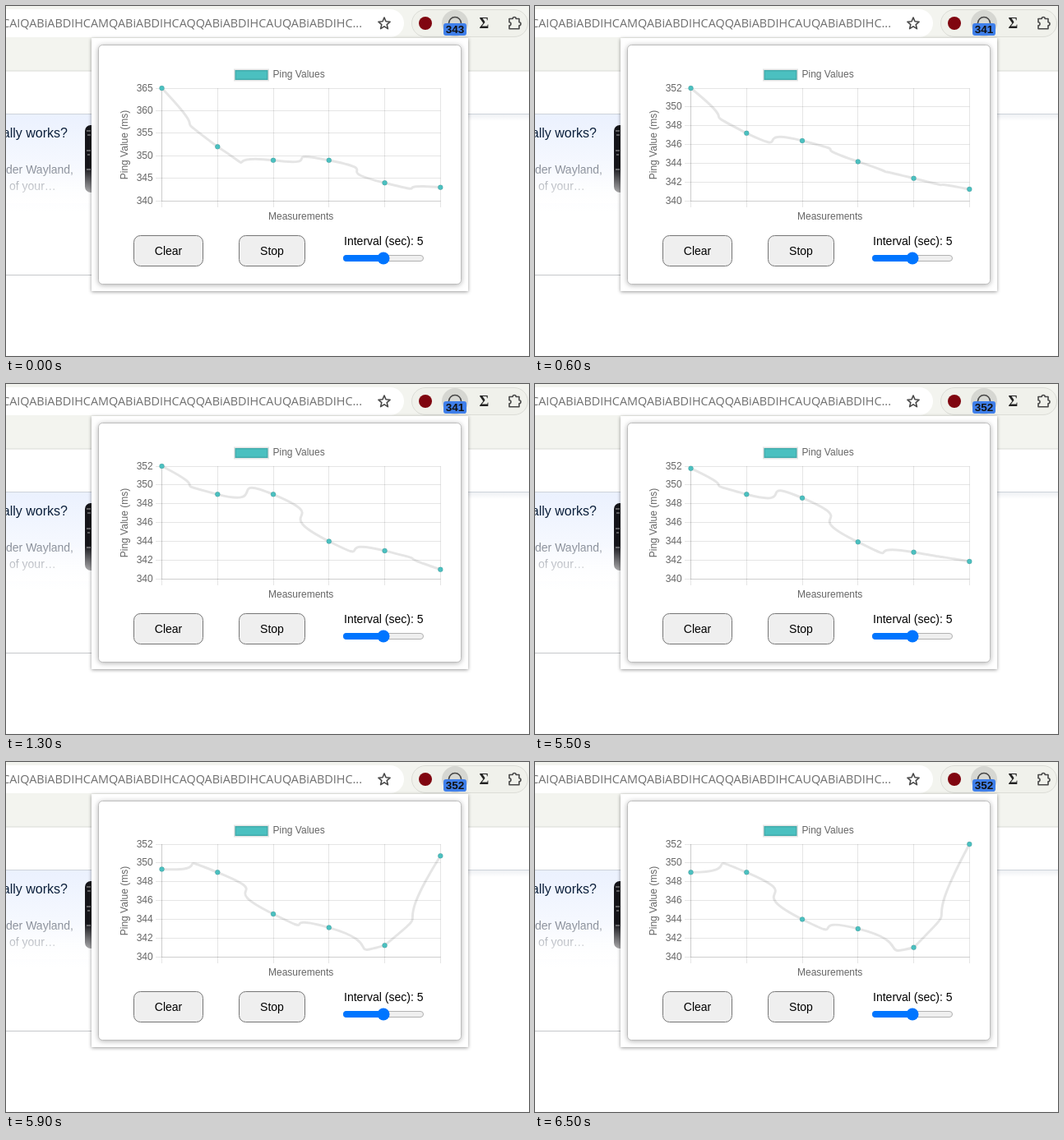
Animation of 636 by 426 pixels, one loop 8000 ms. Source, as an HTML page:

```html
<!DOCTYPE html>
<html lang="en">
<head>
<meta charset="utf-8">
<title>Ping chart</title>
<style>
html, body { margin: 0; width: 100%; height: 100%; overflow: hidden; background: #fff; }
svg { display: block; width: 636px; height: 426px; font-family: "Liberation Sans", Arial, sans-serif; }
.ui { font-size: 14px; fill: #000; text-anchor: middle; }
.chart text { font-size: 12px; fill: #666; }
.mid { text-anchor: middle; }
.end { text-anchor: end; }
.card { fill: #fff; stroke: #bdbdbd; filter: drop-shadow(0 1px 3px rgba(0,0,0,.3)); }
.button { fill: #efefef; stroke: #767676; }
.icon { fill: none; stroke: #474747; stroke-width: 1.6; stroke-linejoin: round; }
.grid { stroke: #000; stroke-opacity: .1; fill: none; }
.line { stroke: #000; stroke-opacity: .1; stroke-width: 3; fill: none; }
.dot { fill: #4bc0c0; stroke: #000; stroke-opacity: .1; }
</style>
</head>
<body>
<svg viewBox="0 0 636 426">
  <defs>
    <linearGradient id="tint" x2="0" y2="1">
      <stop offset="0" stop-color="#ebf1fe"/><stop offset="1" stop-color="#fff"/>
    </linearGradient>
    <linearGradient id="shade" x2="0" y2="1">
      <stop offset="0" stop-color="#dfe3e9"/><stop offset="1" stop-color="#dfe3e9" stop-opacity="0"/>
    </linearGradient>
    <linearGradient id="fade" x2="0" y2="1">
      <stop offset="0" stop-color="#fff" stop-opacity="0"/><stop offset="1" stop-color="#fff" stop-opacity=".9"/>
    </linearGradient>
  </defs>

  <!-- browser bars -->
  <path d="M0 0H636V79H0z" fill="#f3f4ef"/>
  <path d="M0 79H636" stroke="#d9dad6"/>
  <rect x="-30" y="4" width="514" height="34" rx="17" fill="#fff"/>
  <text class="end" x="433" y="26" font-family="'Open Sans','Noto Sans',sans-serif" font-size="14.4" fill="#707070">CAIQABiABDIHCAMQABiABDIHCAQQABiABDIHCAUQABiABDIHC...</text>
  <path class="icon" d="M460 14l2 4.7 5.1.5-3.9 3.4 1.2 5-4.4-2.7-4.4 2.7 1.2-5-3.9-3.4 5.1-.5z"/>
  <rect x="493.500" y="4.500" width="141" height="33" rx="16.500" fill="#f0f1eb" stroke="#dcddd7"/>
  <circle cx="510" cy="21" r="8" fill="#800610"/>
  <circle cx="546" cy="21" r="16" fill="#d6d7d2"/>
  <circle class="icon" cx="546" cy="21" r="7.500"/>
  <rect x="532" y="21" width="28" height="15" rx="3" fill="#3f7fea"/>
  <text id="badge" class="mid" x="546" y="33.200" font-size="13.500" font-weight="bold" fill="#111"></text>
  <text class="mid" x="581.500" y="27" font-family="'Liberation Serif',serif" font-size="18" font-weight="bold" fill="#222">Σ</text>
  <path class="icon" d="M612 15.500h4.200a2 2 0 0 1 4 0h3.800v4.200a2 2 0 0 1 0 4v4h-12v-4a2 2 0 0 0 0-4z"/>

  <!-- page -->
  <rect y="132" width="104" height="118" fill="url(#tint)"/>
  <rect x="562" y="132" width="74" height="8" fill="url(#shade)" opacity=".5"/>
  <path d="M0 131.500H636" stroke="#cdd3da"/>
  <text class="end" x="75" y="160" font-size="16" fill="#0b1f3a">ally works?</text>
  <g font-size="14" fill="#858b96">
    <text class="end" x="82" y="204">der Wayland,</text>
    <text x="4" y="224">of your…</text>
  </g>
  <rect x="96" y="145" width="30" height="82" rx="7" fill="#15151a"/>
  <path d="M98 152h5M99 157h4M98 176h5M99 181h3M98 199h5" stroke="#aaa"/>
  <rect y="196" width="104" height="44" fill="url(#fade)"/>
  <path d="M0 327.500H104" stroke="#c6c8cb"/>
  <path d="M0 425.500H636" stroke="#fafafa"/>

  <!-- popup -->
  <path d="M104 39H562V347H104z" fill="#fff" style="filter:drop-shadow(0 1px 2px rgba(0,0,0,.4))"/>
  <rect class="card" x="112.500" y="47.500" width="441" height="291" rx="5"/>
  <g class="chart">
    <rect x="278.500" y="78" width="40" height="12" fill="#4bc0c0" stroke="#000" stroke-opacity=".1" stroke-width="3"/>
    <text x="324.500" y="87">Ping Values</text>
    <text class="mid" transform="translate(148 169) rotate(-90)">Ping Value (ms)</text>
    <text class="mid" x="358.700" y="260">Measurements</text>
    <path id="grid" class="grid"/>
    <path class="grid" d="M189.500 100V237.500H528.500"/>
    <g id="ticks"></g>
    <path id="line" class="line"/>
    <g id="dots"></g>
  </g>
  <g class="ui">
    <rect class="button" x="155.500" y="279.500" width="84" height="37" rx="8"/>
    <text x="197.500" y="303">Clear</text>
    <rect class="button" x="283.500" y="279.500" width="80" height="37" rx="8"/>
    <text x="323.500" y="303">Stop</text>
    <text x="459.300" y="291">Interval (sec): 5</text>
  </g>
  <rect x="410.500" y="303.500" width="97" height="7" rx="3.500" fill="#efefef" stroke="#b2b2b2"/>
  <rect x="410" y="303" width="52" height="8" rx="4" fill="#0075ff"/>
  <circle cx="459" cy="307" r="7.500" fill="#0075ff"/>
</svg>

<script>
const $ = id => document.getElementById(id);
const LEFT = 189.5, RIGHT = 528.3, TOP = 100, BOTTOM = 237.2, GAP = (RIGHT - LEFT) / 5;
const pings = [365, 352, 349, 349, 344, 343, 341, 352];

// Each update slides the six-value window by one.
const states = [
  { at: -2000, first: 0, max: 365, step: 5 },
  { at: 463, first: 1, max: 352, step: 2 },
  { at: 5480, first: 2, max: 352, step: 2 }
];

const clamp = (v, lo, hi) => Math.min(hi, Math.max(lo, v));
const scaleY = (v, max) => BOTTOM - (v - 340) / (max - 340) * (BOTTOM - TOP);
const heights = s => pings.slice(s.first, s.first + 6).map(v => scaleY(v, s.max));

// Control points either side of a point, for spline tension 1.
function controls(pts, i) {
  const p = pts[i], a = pts[i - 1] || p, b = pts[i + 1] || p;
  const da = Math.hypot(p[0] - a[0], p[1] - a[1]);
  const db = Math.hypot(b[0] - p[0], b[1] - p[1]);
  const offset = k => [
    clamp(p[0] + k * (b[0] - a[0]), LEFT, RIGHT),
    clamp(p[1] + k * (b[1] - a[1]), TOP, BOTTOM)
  ];
  return [offset(-da / (da + db)), offset(db / (da + db))];
}

function curve(pts) {
  const c = pts.map((_, i) => controls(pts, i));
  return "M" + pts[0] + pts.slice(1).map((p, i) => `C${c[i][1]} ${c[i + 1][0]} ${p}`).join("");
}

function drawAxes({ max, step }) {
  let path = "", labels = "";
  for (let i = 0; i < 6; i++) path += `M${Math.floor(LEFT + i * GAP) + .5} ${TOP}V245`;
  for (let v = 340; v <= max; v += step) {
    const y = scaleY(v, max);
    path += `M182 ${Math.floor(y) + .5}H528.5`;
    labels += `<text class="end" x="178.700" y="${y + 3.5}">${v}</text>`;
  }
  $("grid").setAttribute("d", path);
  $("ticks").innerHTML = labels;
}

let shown = -1;
function draw(now) {
  const t = Math.floor(now % 8000 / 100) * 100;
  const n = t < 500 ? 0 : t < 5500 ? 1 : 2;
  const state = states[n];
  const x = clamp((t - state.at) / 1000, 0, 1);
  const ease = 1 - (1 - x) ** 4;
  const from = heights(states[Math.max(0, n - 1)]);
  const pts = heights(state).map((y, i) => [LEFT + i * GAP, from[i] + (y - from[i]) * ease]);

  if (n !== shown) {
    shown = n;
    drawAxes(state);
    $("badge").textContent = pings[state.first + 5];
  }
  $("line").setAttribute("d", curve(pts));
  $("dots").innerHTML = pts.map(([cx, cy]) => `<circle class="dot" cx="${cx}" cy="${cy}" r="3"/>`).join("");
}

const start = performance.now();
function loop() {
  draw(performance.now() - start);
  requestAnimationFrame(loop);
}
loop();
</script>
</body>
</html>
```
